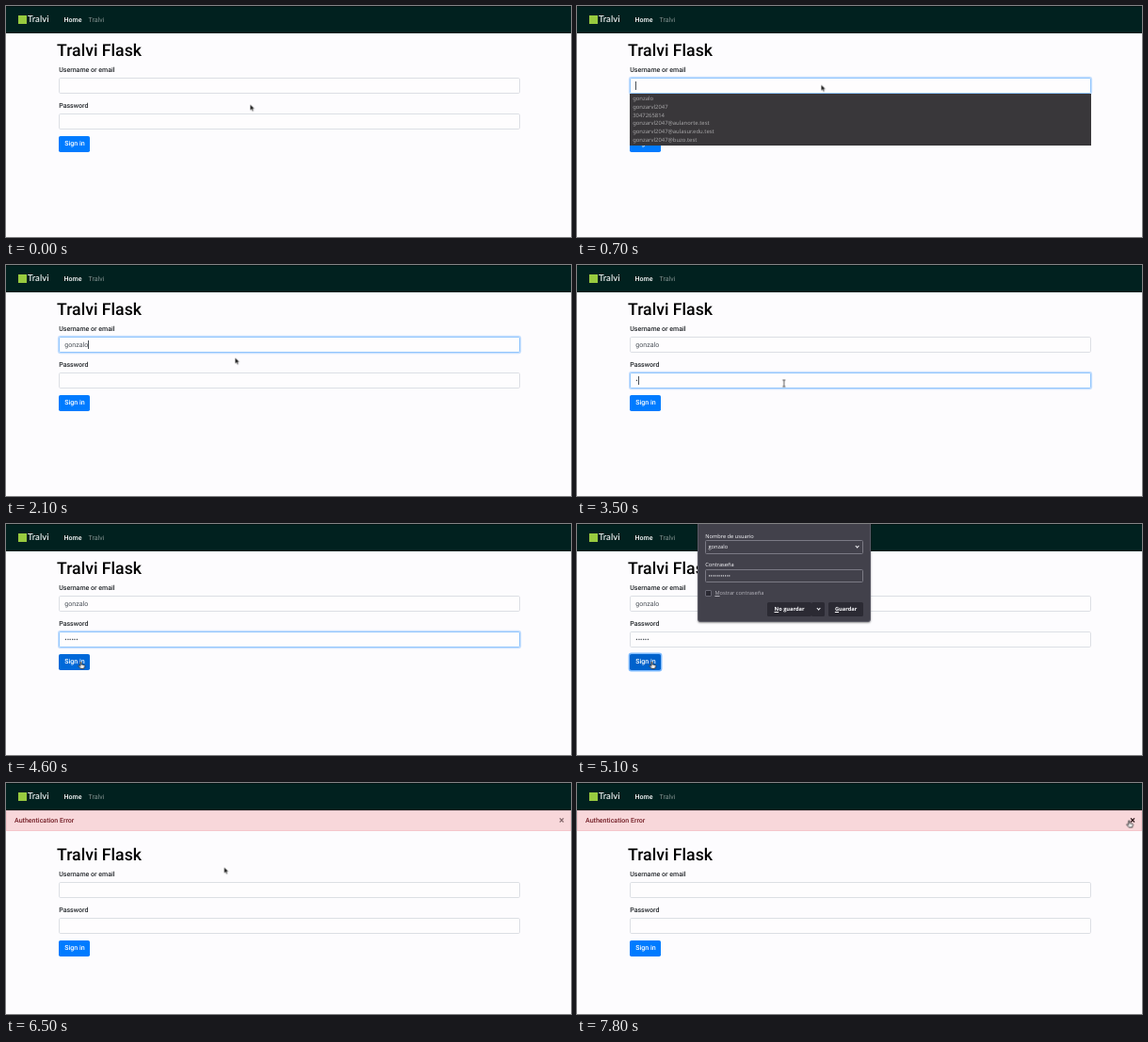
These frames come from a looping animation (600x245 px, 8 s). An HTML page:

```html
<!DOCTYPE html>
<html lang="en">
<head>
<meta charset="utf-8">
<title>Sign in</title>
<style>
html, body { margin: 0; width: 100%; height: 100%; overflow: hidden; }
body { background: #fdfcfe; }
.stage {
  position: relative; width: 600px; height: 245px; overflow: hidden;
  font: 7.06px/20px Roboto, sans-serif; color: #212529; white-space: nowrap;
  text-rendering: geometricPrecision;
}
:where(.stage *) { position: absolute; left: 0; top: 0; box-sizing: border-box; }
u { position: static; text-underline-offset: .5px; text-decoration-thickness: .5px; }
.anim { animation: 8s step-end infinite; }

/* navigation */
nav { width: 600px; height: 29px; background: #01211f; border-top: 1px solid #011413; color: #fff; }
nav span { top: 3.8px; }
.mark { left: 12.5px; top: 9px; width: 9px; height: 9px; background: #98ca3f; }
.brand { left: 23px; font: 500 9.6px/20px Lato, sans-serif; }
.home { left: 61.5px; font-weight: 500; }
.link { left: 87.5px; color: #83918f; }

/* alert */
.alert {
  top: 29px; width: 600px; height: 22px; color: #721c24; background: #f8d7da;
  border: .5px solid #f5c6cb; font-weight: 500; animation-name: alert;
}
.alert span { left: 8px; top: .2px; }
.alert .close { left: 586.2px; top: 0; font-size: 10.6px; font-weight: 700; color: #85686c; animation-name: close; }

/* form */
.page { width: 600px; height: 245px; animation-name: page; }
h1 { margin: 0; left: 54px; top: 38.3px; font: 500 17.66px/20px Roboto, sans-serif; color: #000; }
label { left: 56.2px; font-weight: 500; }
.field {
  left: 56.4px; width: 490px; height: 17px; border: 1px solid #dcdfe4; border-radius: 1.8px;
  background: #fefdfe; color: #495057; line-height: 15px;
}
.user { top: 76.4px; animation-name: focus-user; }
.pass { top: 114.2px; animation-name: focus-pass; }
.field > * { left: 4.9px; height: 15px; }
.name { animation-name: name; }
.dots { width: 0; animation-name: typing; }
.clip { width: 100%; height: 100%; overflow: hidden; }
.caret { left: 100%; top: 3px; width: .7px; height: 9px; background: #495057; }
.user .caret { animation-name: caret-user; }
.pass .caret { animation-name: caret-pass; }
.start { animation-name: caret-start; }
.submit {
  left: 56.4px; top: 138.4px; width: 33px; height: 16.6px; border-radius: 1.8px;
  background: #007bff; color: #fff; font-weight: 500; line-height: 16.6px; animation-name: submit;
}
.submit span { left: 5.8px; }

/* suggestions */
.list {
  left: 56.4px; top: 93.4px; width: 489.6px; height: 54.2px; background: #39373a; color: #a5a4a6;
  font: 5.9px/8.8px "Noto Sans", "Open Sans", sans-serif; padding: .6px 2.8px; white-space: pre; animation-name: list;
}

/* password prompt */
.prompt {
  left: 128px; top: -4px; width: 183.5px; height: 108px; background: #42414b; color: #fbfbfe;
  border: .6px solid #5b5a66; border-radius: 3px; box-shadow: 0 1px 2px #0006;
  font: 5.7px/20px "Open Sans", "Noto Sans", sans-serif; animation-name: prompt;
}
.prompt > span { left: 7.2px; }
.prompt .box { left: 7px; width: 168px; height: 14.2px; border: 1px solid #7b7a85; border-radius: 1.5px; line-height: 12.2px; }
.box span { left: 2.4px; }
.check { left: 7.2px; top: 73.2px; width: 7px; height: 7px; border: .6px solid #686773; border-radius: 1px; background: #2b2a33; }
.btn { top: 86.4px; height: 14.2px; border-radius: 1.6px; background: #2b2a33; line-height: 14px; font-weight: 700; text-align: center; }
.chev { width: 3.2px; height: 3.2px; border: solid #fbfbfe; border-width: 0 .8px .8px 0; transform: rotate(45deg); }

/* pointer */
.pointer { width: 0; height: 0; animation: path 8s infinite; }
.pointer svg { left: -6px; top: -6px; width: 18px; height: 18px; overflow: visible; }
.arrow { animation-name: arrow; }
.beam { animation-name: beam; }
.hand { animation-name: hand; }

/* 100 ms = 1.25% */
@keyframes alert { 0% { visibility: hidden } 70%, 100% { visibility: visible } }
@keyframes close { 0% { color: #85686c } 96.25%, 100% { color: #2d1518 } }
@keyframes page { 0% { transform: none } 70%, 100% { transform: translateY(29px) } }
@keyframes focus-user {
  0%, 36.25%, 100% { border-color: #dcdfe4; box-shadow: none }
  6.25%, 35% { border-color: #b5d0ec; box-shadow: 0 0 0 .7px #007bff1c }
  7.5% { border-color: #92c6fd; box-shadow: 0 0 0 1.2px #007bff36 }
}
@keyframes focus-pass {
  0%, 61.25%, 100% { border-color: #dcdfe4; box-shadow: none }
  35%, 60% { border-color: #b5d0ec; box-shadow: 0 0 0 .7px #007bff1c }
  36.25% { border-color: #92c6fd; box-shadow: 0 0 0 1.2px #007bff36 }
}
@keyframes name { 0%, 70%, 100% { visibility: hidden } 16.25% { visibility: visible } }
@keyframes list { 0%, 16.25%, 100% { visibility: hidden } 7.5% { visibility: visible } }
@keyframes caret-start { 0%, 12.5%, 100% { opacity: 0 } 6.25% { opacity: 1 } }
@keyframes caret-user { 0%, 20%, 35%, 100% { opacity: 0 } 16.25%, 26.25% { opacity: 1 } }
@keyframes caret-pass { 0%, 41.25%, 57.5%, 100% { opacity: 0 } 35%, 42.5% { opacity: 1 } }
@keyframes typing {
  0%, 70%, 100% { width: 0 }
  42.5% { width: 2.4px }
  45% { width: 4.8px }
  47.5% { width: 7.2px }
  48.75% { width: 9.6px }
  50% { width: 12px }
  52.5% { width: 14.6px }
}
@keyframes submit {
  0%, 70%, 100% { background: #007bff; box-shadow: none }
  57.5% { background: #0069d9; box-shadow: none }
  60% { background: #0062cc; box-shadow: 0 0 0 1.4px #007bff80 }
}
@keyframes prompt { 0%, 81.25%, 100% { visibility: hidden } 61.25% { visibility: visible } }
@keyframes arrow {
  0%, 7.5%, 56.25%, 71.25% { visibility: visible }
  2.5%, 31.25%, 57.5%, 96.25%, 100% { visibility: hidden }
}
@keyframes beam { 0%, 7.5%, 56.25%, 100% { visibility: hidden } 2.5%, 31.25% { visibility: visible } }
@keyframes hand { 0%, 71.25% { visibility: hidden } 57.5%, 96.25%, 100% { visibility: visible } }
@keyframes path {
  0% { transform: translate(259.3px, 104.3px); animation-timing-function: steps(3) }
  3.75%, 8.75% { transform: translate(259.3px, 83.4px); animation-timing-function: steps(4) }
  13.75%, 26.25% { transform: translate(243.3px, 98.2px); animation-timing-function: steps(6) }
  33.75%, 52.5% { transform: translate(219.8px, 125.5px); animation-timing-function: steps(4) }
  57.5%, 68.75% { transform: translate(79.5px, 146px); animation-timing-function: steps(8) }
  78.75%, 82.5% { transform: translate(231.6px, 89.2px); animation-timing-function: steps(6) }
  90% { transform: translate(440px, 98px); animation-timing-function: steps(3) }
  93.75% { transform: translate(559px, 75px); animation-timing-function: steps(3) }
  97.5%, 100% { transform: translate(586.3px, 39.6px); animation-timing-function: step-end }
}
</style>
</head>
<body>
<div class="stage">
  <nav>
    <i class="mark"></i><span class="brand">Tralvi</span>
    <span class="home">Home</span><span class="link">Tralvi</span>
  </nav>

  <div class="alert anim"><span>Authentication Error</span><b class="close anim">×</b></div>

  <div class="page anim">
    <h1>Tralvi Flask</h1>
    <label style="top:57.8px">Username or email</label>
    <div class="field user anim">
      <div><i class="caret start anim" style="animation-name:caret-start"></i></div>
      <div class="name anim">gonzalo<i class="caret anim"></i></div>
    </div>
    <label style="top:95.5px">Password</label>
    <div class="field pass anim">
      <div class="dots anim"><span class="clip">••••••</span><i class="caret anim"></i></div>
    </div>
    <div class="submit anim"><span>Sign in</span></div>
  </div>

  <div class="list anim">gonzalo
gonzarvl2047
3047265814
gonzarvl2047@aulanorte.test
gonzarvl2047@aulasur.edu.test
gonzarvl2047@buzo.test</div>

  <div class="prompt anim">
    <span style="top:5.6px">Nombre de usuario</span>
    <div class="box" style="top:20.4px"><span>gonzalo</span><i class="chev" style="left:159px;top:3.6px"></i></div>
    <span style="top:36.2px">Contraseña</span>
    <div class="box" style="top:51.2px"><span>•••••••••••</span></div>
    <i class="check"></i>
    <span style="top:66.4px;left:17.4px;color:#b4b3bb"><u>M</u>ostrar contraseña</span>
    <div class="btn" style="left:73.4px;width:46.4px"><u>N</u>o guardar</div>
    <div class="btn" style="left:120.4px;width:14px"><i class="chev" style="left:5.4px;top:4.6px"></i></div>
    <div class="btn" style="left:137.8px;width:37.6px"><u>G</u>uardar</div>
  </div>

  <div class="pointer">
    <svg class="arrow anim" viewBox="-6 -6 18 18">
      <path d="M0 0V6.6L1.5 5.2L2.6 7.6L3.7 7.1L2.7 4.8H4.8Z" fill="#111" stroke="#fff" stroke-width=".5"/>
    </svg>
    <svg class="beam anim" viewBox="-6 -6 18 18">
      <path d="M-1.5 -3.4H1.5M0 -3.4V3.4M-1.5 3.4H1.5" fill="none" stroke="#333" stroke-width=".8"/>
    </svg>
    <svg class="hand anim" viewBox="-6 -6 18 18">
      <path d="M-.7 .6Q0 -.4 .7 .6V3L3.6 3.5Q4.4 3.8 4.2 4.8L3.4 7.4H-.2L-2.6 4.6Q-2.5 3.6 -1.5 4.1L-.7 4.8Z" fill="#eee" stroke="#222" stroke-width=".8"/>
    </svg>
  </div>
</div>
</body>
</html>
```
